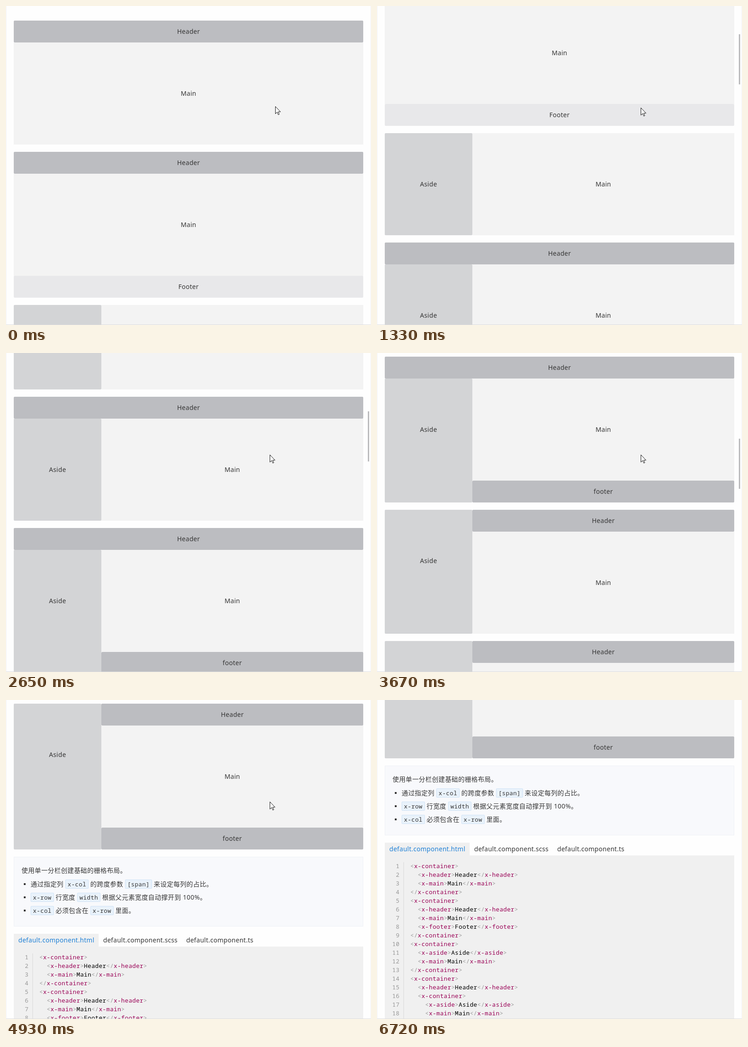
Recreate the animation shown at these times as an HTML page. Size 800 by 700 pixels, loop 7350 ms.

```html
<!DOCTYPE html>
<html lang="zh">
<head>
<meta charset="utf-8">
<title>Layout container</title>
<style>
  html, body { margin: 0; width: 100%; height: 100%; overflow: hidden; background: #fefefe; }
  body { position: relative; color: #363636; font: 14px "Noto Sans", "Noto Sans CJK SC", "Noto Sans CJK", sans-serif; letter-spacing: .3px; }
  #page { position: absolute; left: 17px; top: 32px; width: 766px; }

  .container { margin-bottom: 16px; text-align: center; }
  .row { display: flex; }
  .row > :last-child { flex: 1; }
  header, footer { height: 48px; line-height: 48px; border-radius: 2px; background: #bcbdc1; }
  .container > footer { background: #e8e8ea; }
  main { height: 224px; line-height: 224px; background: #f3f3f3; }
  aside { width: 192px; line-height: 224px; border-radius: 2px; background: #d3d4d6; }

  .notes { box-sizing: border-box; height: 153px; margin-bottom: 16px; padding: 14px 16px; border: 1px solid #eff1f6; background: #f8f9fc; line-height: 29px; letter-spacing: .4px; white-space: nowrap; }
  .notes p { margin: 0 0 1px; }
  .notes div { position: relative; padding-left: 20px; }
  .notes div::before { content: ""; position: absolute; left: 5px; top: 13px; width: 4px; height: 4px; background: #363636; }
  code { padding: 0 4px; border: 1px solid #cfe3f6; border-radius: 2px; background: #e9f2fb; line-height: 1; }
  code, .code { font-family: "Noto Sans Mono", "DejaVu Sans Mono", monospace; font-size: 13px; letter-spacing: .35px; }

  .tabs { position: relative; height: 28px; line-height: 28px; }
  .tabs span { position: absolute; box-sizing: border-box; padding-left: 10px; white-space: nowrap; }
  .tabs .active { width: 186px; background: #f0f0f0; color: #1f80d6; }

  .code { position: relative; height: 400px; padding-top: 14px; background: #f0f0f0; color: #000; line-height: 19px; white-space: pre; }
  .code::before { content: ""; position: absolute; left: 41px; top: 15px; bottom: 0; width: 1px; background: #d9d9d9; }
  .code div { height: 19px; }
  .code u { display: inline-block; width: 32.5px; margin-right: 23.5px; text-align: right; text-decoration: none; }
  .code u, .code i { color: #999; font-style: normal; }
  .code b { color: #905; font-weight: normal; }

  #frame { position: absolute; inset: 0; border: solid #f3f3f7; border-width: 0 1px; border-bottom: 1px solid #dcdcde; }
  #bar { position: absolute; left: 793px; top: 0; width: 3px; height: 110px; background: #bcbcbe; }
  #cursor { position: absolute; left: 0; top: 0; }
</style>
</head>
<body>
<div id="page">
  <div class="container"><header>Header</header><main>Main</main></div>
  <div class="container"><header>Header</header><main>Main</main><footer>Footer</footer></div>
  <div class="container row"><aside>Aside</aside><main>Main</main></div>
  <div class="container"><header>Header</header><div class="row"><aside>Aside</aside><main>Main</main></div></div>
  <div class="container"><header>Header</header><div class="row"><aside>Aside</aside><div><main>Main</main><footer>footer</footer></div></div></div>
  <div class="container row"><aside>Aside</aside><div><header>Header</header><main>Main</main></div></div>
  <div class="container row"><aside>Aside</aside><div><header>Header</header><main>Main</main><footer>footer</footer></div></div>

  <div class="notes">
    <p>使用单一分栏创建基础的栅格布局。</p>
    <div>通过指定列 <code>x-col</code> 的跨度参数 <code>[span]</code> 来设定每列的占比。</div>
    <div><code>x-row</code> 行宽度 <code>width</code> 根据父元素宽度自动撑开到 100%。</div>
    <div><code>x-col</code> 必须包含在 <code>x-row</code> 里面。</div>
  </div>

  <div class="tabs">
    <span class="active">default.component.html</span>
    <span style="left:186px">default.component.scss</span>
    <span style="left:368px">default.component.ts</span>
  </div>
  <div class="code" id="code"></div>
</div>
<div id="frame"></div>
<div id="bar"></div>
<svg id="cursor" width="14" height="21"><path d="M.5 .5v16l3.7-3.6 2.5 5.7 2.3-1-2.5-5.4h5.1z" fill="#fff" stroke="#111"/></svg>

<script>
  const $ = id => document.getElementById(id);
  const page = $('page'), bar = $('bar'), cursor = $('cursor');

  // Code listing
  const open = '<x-container>', close = '</x-container>';
  const el = (name, depth = 1) => {
    const text = name[0].toUpperCase() + name.slice(1);
    return '  '.repeat(depth) + `<x-${name}>${text}</x-${name}>`;
  };
  const lines = [
    open, el('header'), el('main'), close,
    open, el('header'), el('main'), el('footer'), close,
    open, el('aside'), el('main'), close,
    open, el('header'), '  ' + open, el('aside', 2), el('main', 2)
  ];
  const paint = line => line.replace(/<(\/?)([\w-]+)>/g, '<i>&lt;$1</i><b>$2</b><i>&gt;</i>');
  $('code').innerHTML = lines.map((line, i) => `<div><u>${i + 1}</u>${paint(line)}</div>`).join('');

  // Wheel bursts: start time, step length, scroll positions
  const LOOP = 7350;
  const bursts = [
    [710, 75, [26, 89, 100]],
    [1190, 70, [145, 314, 377, 400]],
    [1810, 75, [432, 530, 584, 600]],
    [2420, 75, [632, 730, 784, 800]],
    [2970, 75, [836, 964, 1000]],
    [3520, 75, [1030, 1100, 1176, 1290, 1375, 1400]],
    [4070, 75, [1440, 1540, 1660, 1770, 1800]],
    [5250, 74, [1820, 1860, 1900, 1935, 1983, 2000]]
  ];

  function scrollAt(t) {
    const burst = bursts.findLast(([start]) => t >= start);
    if (!burst) return 0;
    const [start, step, stops] = burst;
    return stops[Math.min(stops.length - 1, Math.floor((t - start) / step))];
  }

  const fade = (t, start) => t < start ? 1 : Math.max(0, 2 - Math.floor((t - start) / 80)) / 3;

  function barOpacity(t) {
    if (t < 710) return 0;
    return t < 5250 ? fade(t, 4770) : fade(t, 6020);
  }

  function cursorAt(t) {
    if (t < 70) return [590, 220];
    if (t < 5550) return [578, 223];
    if (t < 5850) return [580, 241];
    if (t >= 6720) return [0, -40];
    if (t >= 6650) return [727, 685];
    const p = (Math.floor((t - 5850) / 80) + 1) / 10;
    const e = p * p * (3 - 2 * p);
    return [580 + 144 * e, 241 + 437 * e].map(Math.round);
  }

  const start = performance.now();
  function draw() {
    const t = (performance.now() - start) % LOOP;
    const scroll = scrollAt(t), [x, y] = cursorAt(t);
    page.style.transform = `translateY(${-scroll}px)`;
    bar.style.transform = `translateY(${Math.round(2.4 + scroll * .1574)}px)`;
    bar.style.opacity = barOpacity(t);
    cursor.style.transform = `translate(${x}px, ${y}px)`;
    requestAnimationFrame(draw);
  }
  draw();
</script>
</body>
</html>
```
